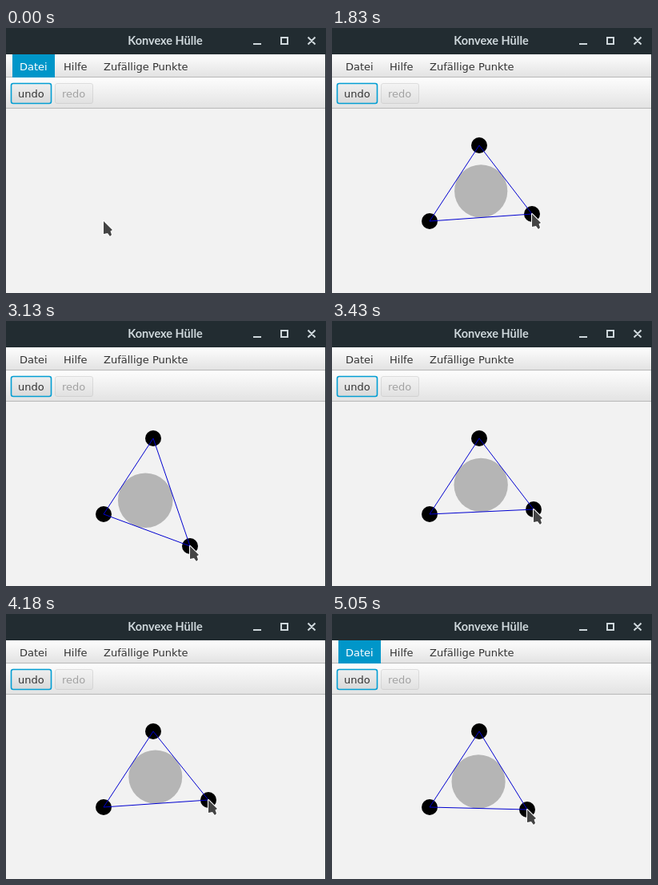
These frames come from a looping animation (400x332 px, 5220 ms). An HTML page:

```html
<!DOCTYPE html>
<html lang="de">
<head>
<meta charset="utf-8">
<title>Konvexe Hülle</title>
<style>
  html, body { margin: 0; width: 100%; height: 100%; overflow: hidden; background: #f2f2f2; }
  svg { display: block; width: 400px; height: 332px; }
  text { font: 13px "DejaVu Sans", sans-serif; fill: #333; }
  .title { font: bold 14.5px Lato, sans-serif; fill: #cfd8dc; text-anchor: middle; }
  .icons { fill: none; stroke: #cfd8dc; stroke-width: 2; }
</style>
</head>
<body>
<svg viewBox="0 0 400 332">
  <defs>
    <linearGradient id="bar" x2="0" y2="1">
      <stop stop-color="#fdfdfd"/><stop offset="1" stop-color="#e3e3e3"/>
    </linearGradient>
    <linearGradient id="face" x2="0" y2="1">
      <stop stop-color="#efefef"/><stop offset="1" stop-color="#d9d9d9"/>
    </linearGradient>
  </defs>

  <rect width="400" height="332" fill="#f2f2f2"/>
  <rect width="400" height="33" fill="#222c31"/>
  <text class="title" x="199" y="21">Konvexe Hülle</text>
  <path class="icons" d="M309 20h10M344 12h8v8h-8zM377.5 11.5l9 9m0-9l-9 9"/>

  <rect y="33" width="400" height="28" fill="url(#bar)"/>
  <rect y="61" width="400" height="1" fill="#b8b8b8"/>
  <rect y="62" width="400" height="38" fill="url(#bar)"/>
  <rect y="100" width="400" height="1" fill="#b8b8b8"/>
  <rect id="menuMark" x="8" y="33" width="53" height="29" fill="#0096c9"/>
  <text id="menuText" x="17" y="53">Datei</text>
  <text x="72" y="53">Hilfe</text>
  <text x="122" y="53">Zufällige Punkte</text>

  <rect x="6.5" y="69.5" width="50" height="25" rx="2.5" fill="url(#face)" stroke="#039ed3" stroke-width="1.6"/>
  <text x="15" y="87">undo</text>
  <g opacity=".4">
    <rect x="61.5" y="69.5" width="47" height="25" rx="2.5" fill="url(#face)" stroke="#b5b5b5"/>
    <text x="70" y="87">redo</text>
  </g>

  <circle id="incircle" fill="#b5b5b5"/>
  <g id="dots"><circle r="10"/><circle r="10"/><circle r="10"/></g>
  <polygon id="hull" fill="none" stroke="#0000d0"/>
  <path id="cursor" d="M0 0V16L5 15L8 19L10 17L8.5 12.5L11 11Z" fill="#444"
        stroke="#fff" stroke-width="2" stroke-linejoin="round" paint-order="stroke"/>
  <rect x="399" y="33" width="1" height="299" fill="#222c31"/>
</svg>
<script>
const LOOP = 5220;
const el = id => document.getElementById(id);
const dots = [...el("dots").children];
const A = [122, 242], B = [184, 147], C = [250, 233];

// Pointer jumps before dragging starts: [time, x, y]
const jumps = [
  [0, 122, 242], [700, 125, 233], [830, 153, 192], [930, 177, 156], [1100, 184, 147],
  [1430, 194, 170], [1630, 224, 205], [1730, 250, 233]
];

// Drags: start, end, step length and the path as [time, x, y]
const drags = [
  { from: 2580, to: 2930, step: 37.5, path: [[2540, 250, 233], [2730, 238, 262], [2930, 228, 286]] },
  { from: 3100, to: 3580, step: 33, path: [[3070, 228, 286], [3250, 238, 263], [3430, 252, 236], [3580, 259, 229]] },
  { from: 3630, to: 4150, step: 40, path: [[3590, 259, 229], [3860, 267, 213], [4150, 254, 230]] },
  { from: 4180, to: 4550, step: 37, path: [[4180, 253, 233], [4370, 248, 240], [4550, 244, 245]] }
];

function along(path, t) {
  if (t <= path[0][0]) return path[0].slice(1);
  for (let i = 1; i < path.length; i++) {
    const [t0, x0, y0] = path[i - 1], [t1, x1, y1] = path[i];
    if (t < t1) {
      const k = (t - t0) / (t1 - t0);
      return [Math.round(x0 + (x1 - x0) * k), Math.round(y0 + (y1 - y0) * k)];
    }
  }
  return path[path.length - 1].slice(1);
}

function dragged(t, lag = 0) {
  const drag = drags.findLast(d => t >= d.from);
  if (!drag) return C;
  const { from, to, step, path } = drag;
  if (t >= to) return along(path, to);
  return along(path, from + Math.floor((t - from) / step) * step - lag);
}

function pointer(t) {
  if (t < 2580) return jumps.findLast(j => t >= j[0]).slice(1);
  if (t >= 4850 && t < 4950) return [244, 247];
  if (t >= 4950 && t < 5050) return [244, 246];
  return dragged(t, t < 2930 ? 85 : 0);
}

function incircle(a, b, c) {
  const dist = (p, q) => Math.hypot(p[0] - q[0], p[1] - q[1]);
  const la = dist(b, c), lb = dist(a, c), lc = dist(a, b), sum = la + lb + lc;
  const mix = i => (la * a[i] + lb * b[i] + lc * c[i]) / sum;
  const area2 = Math.abs((b[0] - a[0]) * (c[1] - a[1]) - (b[1] - a[1]) * (c[0] - a[0]));
  return { cx: mix(0), cy: mix(1), r: area2 / sum };
}

function setAttrs(node, attrs) {
  for (const name in attrs) node.setAttribute(name, attrs[name]);
}

function draw(t) {
  const menuOpen = t < 380 || t >= 5050;
  el("menuMark").style.display = menuOpen ? "" : "none";
  el("menuText").style.fill = menuOpen ? "#fff" : "#333";

  const count = [480, 1100, 1830].filter(start => t >= start).length;
  const points = [A, B, dragged(t)].slice(0, count);
  dots.forEach((dot, i) => {
    dot.style.display = i < count ? "" : "none";
    if (i < count) setAttrs(dot, { cx: points[i][0], cy: points[i][1] });
  });
  el("hull").setAttribute("points", count > 1 ? points.join(" ") : "");
  setAttrs(el("incircle"), count === 3 ? incircle(...points) : { r: 0 });
  el("cursor").setAttribute("transform", `translate(${pointer(t)})`);
}

const start = performance.now();
function tick() {
  draw((performance.now() - start) % LOOP);
  requestAnimationFrame(tick);
}
tick();
</script>
</body>
</html>
```
